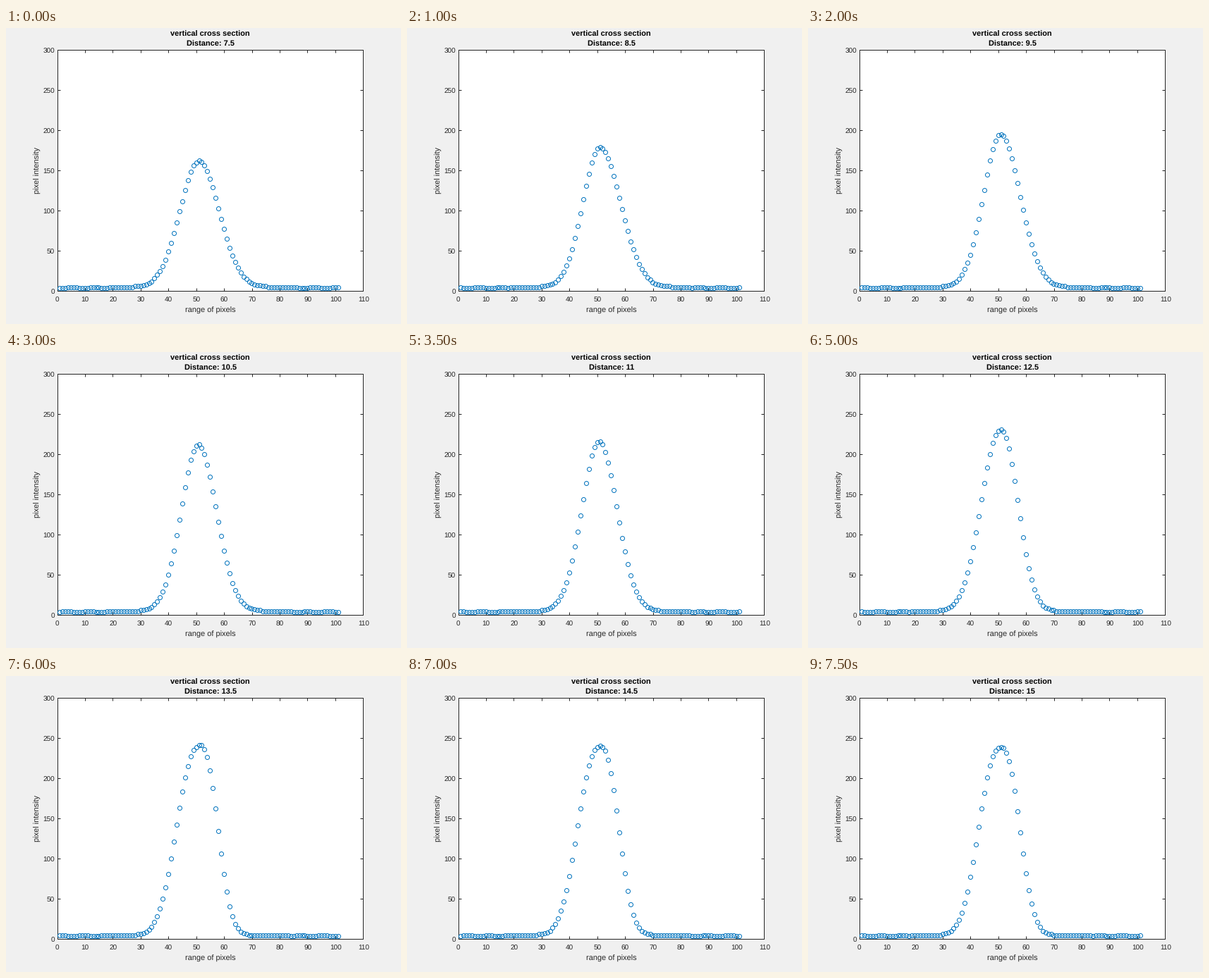
A matplotlib script that plays this animation: 560x420 px, repeating every 8 s.

```python
import numpy as np
import matplotlib.pyplot as plt
from matplotlib.animation import FuncAnimation

W, H, DPI = 560, 420, 100
PX = 72 / DPI                      # one pixel in points
XMAX, YMAX = 110, 300
INK, BLUE = "#262626", "#0072BD"
FRAMES, INTERVAL = 16, 500
X = np.arange(1, 102)

plt.rcParams.update({"font.family": "Liberation Sans", "text.hinting": "none"})

# Key points of the hump: its top and where it falls to half height.
STEPS = (0, 2, 6, 9, 12, 15)
PEAK = (162, 179, 212, 226, 241, 239)
CENTRE = (51, 51, 50.7, 50.7, 51.4, 51)
LEFT_HALF = (42.9, 43.7, 43.5, 43.1, 42.1, 42.2)
RIGHT_HALF = (59.5, 59.7, 58.4, 57.9, 58.4, 58.4)


def intensity(i):
    """Bell curve with uneven sides on a faintly rippled background."""
    peak, centre, left, right = (
        np.interp(i, STEPS, key) for key in (PEAK, CENTRE, LEFT_HALF, RIGHT_HALF))
    power = np.interp(i, (9, 12), (2, 2.4))
    reach = np.where(X < centre, centre - left, right - centre)
    bell = 0.5 ** (np.abs(X - centre) / reach) ** power
    ripple = (np.abs(X - 51) > 32) & (np.sin(0.8 * X + 2.4 * i) > 0)
    return np.rint(5 - ripple + (peak - 5) * bell)


def to_px(x):
    return 72.8 + x * 434 / XMAX


def to_py(y):
    return 373.8 - y * 342.3 / YMAX


def offsets(i):
    """Marker centres on whole pixels, as figure fractions."""
    column = np.floor(to_px(X)) + 0.5
    row = np.floor(to_py(intensity(i))) + 0.5
    return np.column_stack([column / W, 1 - row / H])


fig = plt.figure(figsize=(W / DPI, H / DPI), dpi=DPI, facecolor="#f0f0f0")
ax = fig.add_axes([72.55 / W, 46.7 / H, 433.8 / W, 342 / H])
xticks, yticks = range(0, XMAX + 1, 10), range(0, YMAX + 1, 50)
ax.set(xlim=(0, XMAX), ylim=(0, YMAX), xticks=xticks, yticks=yticks)
ax.tick_params(direction="in", top=True, right=True, length=4 * PX, width=PX,
               color=INK, labelbottom=False, labelleft=False)
for spine in ax.spines.values():
    spine.set(linewidth=PX, edgecolor=INK)


def label(x, y, text, size=11, color=INK, ha="center", **style):
    return fig.text(x / W, 1 - y / H, text, fontsize=size * PX, color=color,
                    ha=ha, va="baseline", rotation_mode="anchor", **style)


for v in xticks:
    label(to_px(v), 389, v, size=10)
for v in yticks:
    label(69, to_py(v) + 4.6, v, size=10, ha="right")

MID = to_px(XMAX / 2)
label(MID, 12, "vertical cross section", color="black", weight="bold")
distance = label(MID, 26, "", color="black", weight="bold")
label(MID, 404, "range of pixels")
label(48, 202.3, "pixel intensity", rotation=90)

dots = ax.scatter(X, X, s=(6 * PX) ** 2, facecolors="none", edgecolors=BLUE,
                  linewidths=PX, transform=fig.transFigure, clip_on=False,
                  zorder=3)
dots.set_snap(False)


def update(i):
    dots.set_offsets(offsets(i))
    distance.set_text(f"Distance: {7.5 + i / 2:g}")
    return dots, distance


anim = FuncAnimation(fig, update, frames=FRAMES, interval=INTERVAL,
                     repeat=True, repeat_delay=0)
plt.show()
```
